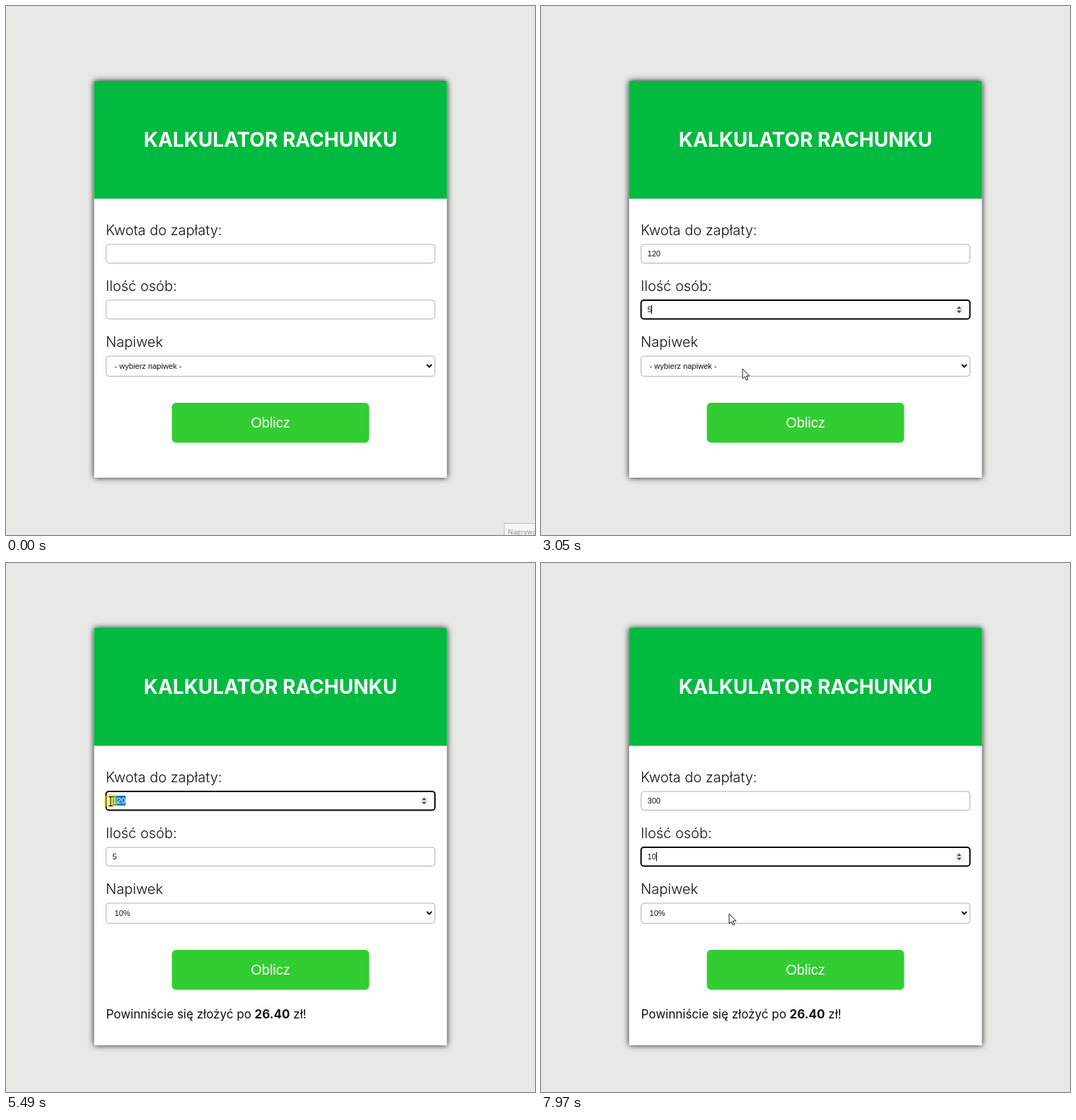
Recreate the animation shown at these times as an HTML page. Size 748 px wide and 748 px high, loop 8 s.

```html
<!DOCTYPE html>
<html lang="pl">
<head>
<meta charset="utf-8">
<title>Kalkulator rachunku</title>
<style>
  html, body { margin: 0; width: 100%; height: 100%; overflow: hidden; background: #e8e8e7; }
  svg { display: block; width: 100%; height: 100%; }
  text { white-space: pre; font-family: "Liberation Sans", Arial, sans-serif; font-size: 11.1px; fill: #111; }
  .title, .label, .result { font-family: Inter, sans-serif; }
  .title { font-size: 28px; font-weight: 700; fill: #fff; text-anchor: middle; }
  .label { font-size: 20px; font-weight: 300; }
  .result { font-size: 17px; }
  .result tspan { font-weight: 700; }
  .button { font-size: 20px; fill: #fff; text-anchor: middle; }
  .hint { font-family: "Open Sans", sans-serif; font-size: 9.8px; fill: #8a8a8a; }
  .box { fill: #fff; stroke: #b0b0b0; }
  .focus .box { stroke: #000; stroke-width: 2; }
  .card { filter: drop-shadow(0 0 4px rgba(0, 0, 0, .9)); }
  .list { filter: drop-shadow(0 1px 2px rgba(0, 0, 0, .4)); }
  .pointer path { display: none; stroke: #000; stroke-width: .9; fill: #fff; stroke-linejoin: round; }
</style>
</head>
<body>
<svg viewBox="0 0 748 748">
  <rect width="748" height="748" fill="#e8e8e7"/>
  <g id="hint">
    <rect x="704.5" y="731.5" width="60" height="30" fill="#f5f5f5" stroke="#bcbcbc"/>
    <text class="hint" x="709.5" y="747">Nagrywanie</text>
  </g>
  <g id="page">
    <rect id="card" class="card" x="124.5" y="106" width="499" height="561" rx="1.5" fill="#fefefe"/>
    <path d="M124.5 272.5V107.5q0-1.5 1.5-1.5h496q1.5 0 1.5 1.5v165z" fill="#01ba40"/>
    <text class="title" x="374" y="199">KALKULATOR RACHUNKU</text>
    <text class="label" x="141" y="324">Kwota do zapłaty:</text>
    <text class="label" x="141" y="403">Ilość osób:</text>
    <text class="label" x="141" y="482">Napiwek</text>
    <g id="fields"></g>
    <rect class="box" x="141.5" y="495" width="465" height="28.5" rx="4"/>
    <text id="tip" x="153.5" y="513"></text>
    <path d="M595 507l3.5 3.5 3.5-3.5" fill="none" stroke="#000" stroke-width="1.8"/>
    <rect x="234.5" y="561" width="279" height="56.5" rx="6" fill="#32cd32"/>
    <text class="button" x="374" y="596">Oblicz</text>
    <text id="result" class="result" x="141.5" y="658">Powinniście się złożyć po <tspan>26.40</tspan> zł!</text>
    <g id="list">
      <rect class="list" x="141.5" y="524.5" width="465" height="70" fill="#fff" stroke="#767676"/>
      <rect id="hover" x="142" width="464" height="13.8" fill="#1e90ff"/>
      <g id="options"></g>
    </g>
  </g>
  <circle id="click" r="10.3" fill="#f0e800" opacity=".48"/>
  <g id="pointer" class="pointer">
    <path id="arrow" d="M0 0v14l3.2-3 2.2 5 2.2-1-2.2-4.8h4.4z"/>
    <path id="beam" style="fill:none;stroke-width:1.1" d="M-3-6.5h2l1 .8 1-.8h2M0-6V6M-3 6.5h2l1-.8 1 .8h2"/>
    <path id="hand" d="M-1.2 1.2q1.4-2.4 2.8 0v5.3l5 1q2.4.6 2 3l-1 4.5v3.2H0l-1-3-3.8-5.2q-.4-2 1.3-1.7l2.3 2zM1.6 6.5v3M4.2 7v2.5M6.6 7.5V10"/>
  </g>
</svg>
<script>
const LOOP = 8000;
const DIGIT = 11.1 * 0.556;
const TEXT_X = 150.5;
const PROMPT = "- wybierz napiwek -";
const OPTIONS = [PROMPT, "5%", "10%", "15%", "20%"];
const ROW = 13.6, LIST_TOP = 525;
const FIELD_TOPS = [337, 416];

// [time, x, y] of the pointer's hot spot
const PATH = [
  [-40, 800, 780], [410, 338, 350], [1240, 338, 350], [1980, 302, 435],
  [2480, 302, 435], [3060, 285, 513], [3180, 285, 513], [3270, 283, 526], [3570, 278, 554],
  [4100, 278, 554], [4410, 294, 588], [4890, 294, 588],
  [5300, 186, 337], [5360, 186, 337], [5690, 77, 336], [5800, 72, 335],
  [6390, 72, 335], [6820, 186, 420], [7020, 186, 420], [7260, 73, 418], [7340, 73, 418],
  [7700, 267, 500], [7830, 267, 500], [7970, 266, 496]
];
// [time, text] of each number field
const TYPED = [
  [[0, ""], [1320, "1"], [1460, "12"], [1620, "120"], [6230, "3"], [6390, "30"], [6510, "300"]],
  [[0, ""], [2520, "5"], [7430, "1"], [7550, "10"]]
];
const FOCUS = [[0, -1], [680, 0], [2050, 1], [3150, -1], [5320, 0], [7020, 1]];
const CLICKS = [[680, 780], [2050, 2220], [3130, 3260], [3810, 3880], [4430, 4550], [5320, 5730], [7020, 7320]];
const DRAGS = [[5320, 5730, 6230], [7020, 7320, 7430]]; // press, release, overwritten
const OPEN = [3180, 3880];
const RESULT_TIME = 4510;

const $ = id => document.getElementById(id);
const show = (node, on) => { node.style.display = on ? "inline" : "none"; };
const within = (t, [from, to]) => t >= from && t < to;
const latest = (steps, t) => steps.findLast(([time]) => time <= t)[1];

function pointerAt(t) {
  const next = PATH.findIndex(([time]) => time > t);
  if (next < 0) return PATH.at(-1).slice(1);
  const [t0, x0, y0] = PATH[next - 1], [t1, x1, y1] = PATH[next];
  const u = (t - t0) / (t1 - t0);
  const eased = next === 1 ? 1 - (1 - u) ** 2 : u * u * (3 - 2 * u);
  return [x0 + (x1 - x0) * eased, y0 + (y1 - y0) * eased];
}

$("fields").innerHTML = FIELD_TOPS.map(y => `
  <g>
    <rect class="box" x="141.5" y="${y}" width="465" height="26.5" rx="4"/>
    <rect class="mark" y="${y + 6}" height="14" fill="#0078d7"/>
    <text x="${TEXT_X}" y="${y + 17}"></text>
    <rect class="caret" y="${y + 7}" width="1" height="12.5"/>
    <g class="spin">
      <rect x="586" y="${y + 8}" width="11" height="11" fill="#efefef"/>
      <path d="M588 ${y + 12.3}l3.2-3.6 3.2 3.6zm0 2.4l3.2 3.6 3.2-3.6z" fill="#444"/>
    </g>
  </g>`).join("");
$("options").innerHTML = OPTIONS.map((name, i) =>
  `<text x="153.5" y="${LIST_TOP + ROW * i + 10.2}">${name}</text>`).join("");

function drawField(field, i, t, x, hovered) {
  const value = latest(TYPED[i], t);
  const focused = latest(FOCUS, t) === i;
  const [press, , overwritten] = DRAGS[i];
  let start = value.length;
  if (within(t, [press, overwritten])) {
    start = Math.max(0, Math.min(start, Math.round((x - TEXT_X) / DIGIT)));
  }
  const selected = value.slice(start);
  const part = name => field.querySelector(name);
  field.setAttribute("class", focused ? "focus" : "");
  part("text").innerHTML = value.slice(0, start) + (selected && `<tspan fill="#fff">${selected}</tspan>`);
  part(".mark").setAttribute("x", TEXT_X + start * DIGIT);
  part(".mark").setAttribute("width", selected.length * DIGIT);
  part(".caret").setAttribute("x", Math.round(TEXT_X + value.length * DIGIT - 0.3));
  show(part(".caret"), focused && !selected && !within(t, [1240, 1320]));
  show(part(".spin"), focused || hovered);
}

function draw(t) {
  const [x, y] = pointerAt(t);
  const done = t >= RESULT_TIME;
  const shift = done ? -14 : 0;
  const pageY = y - shift;
  const open = within(t, OPEN);
  const over = (left, top, right, bottom) => x >= left && x <= right && pageY >= top && pageY <= bottom;

  show($("hint"), t < 100);
  $("page").setAttribute("transform", `translate(0 ${shift})`);
  $("card").setAttribute("height", done ? 590 : 561);
  show($("result"), done);
  $("tip").textContent = t < OPEN[1] ? PROMPT : "10%";

  const hovered = FIELD_TOPS.map(top => over(141, top, 607, top + 27));
  [...$("fields").children].forEach((field, i) => drawField(field, i, t, x, hovered[i]));

  show($("list"), open);
  const row = Math.floor((y - LIST_TOP) / ROW);
  show($("hover"), open && row > 0);
  $("hover").setAttribute("y", LIST_TOP + ROW * row);
  [...$("options").children].forEach((option, i) => {
    option.style.fill = i === 0 ? "#777" : i === row ? "#fff" : "#111";
  });

  const dragging = DRAGS.some(drag => within(t, drag));
  const shape = dragging || hovered.includes(true) ? "beam"
    : !open && over(234, 561, 514, 618) ? "hand" : "arrow";
  for (const id of ["arrow", "beam", "hand"]) show($(id), id === shape);
  show($("pointer"), t >= 30);
  $("pointer").setAttribute("transform", `translate(${Math.round(x)} ${Math.round(y)})`);
  show($("click"), CLICKS.some(click => within(t, click)));
  $("click").setAttribute("cx", x);
  $("click").setAttribute("cy", y);
}

const begin = performance.now();
function tick() {
  draw((performance.now() - begin) % LOOP);
  requestAnimationFrame(tick);
}
tick();
</script>
</body>
</html>
```
